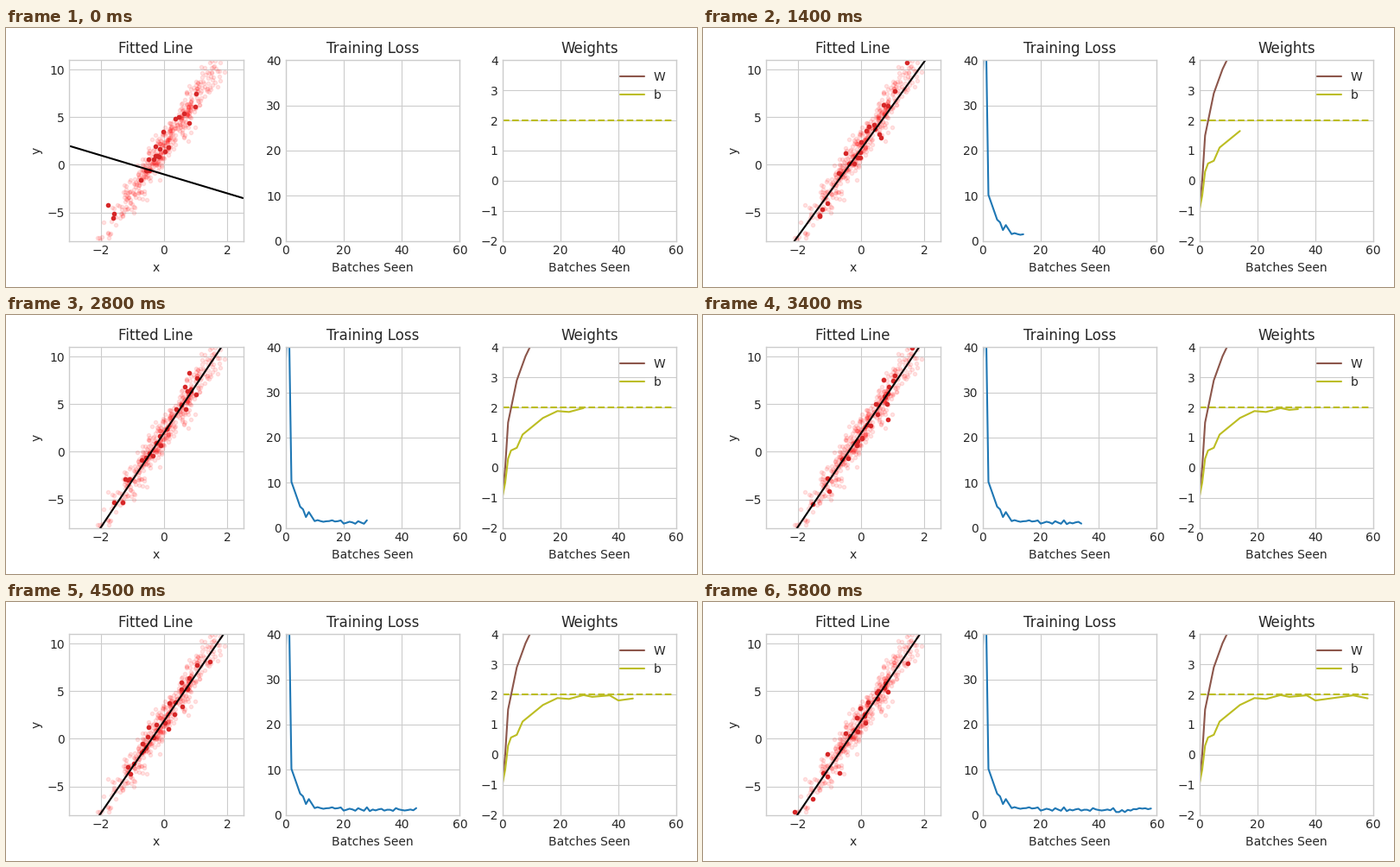
A matplotlib script that plays this animation: 800x300 px, repeating every 5900 ms.

```python
import matplotlib.pyplot as plt
import numpy as np
from matplotlib.animation import FuncAnimation

STEPS, BATCH, COUNT = 59, 25, 500
TRUE_W, TRUE_B = 5, 2

plt.style.use("seaborn-v0_8-whitegrid")
plt.rcParams.update({"font.family": "DejaVu Sans", "font.size": 10})

# Noisy linear data, reshuffled every epoch
rng = np.random.default_rng(3)
xs = rng.normal(0, 1, COUNT)
ys = TRUE_W * xs + TRUE_B + rng.normal(0, 1, COUNT)
order = np.concatenate([rng.permutation(COUNT) for _ in range(3)])

steps = np.arange(STEPS)


def curve(*points):
    """Value at every step, linear between (step, value) points."""
    return np.interp(steps, *zip(*points))


# Training history: fast descent, then jitter around the optimum
w = curve((0, -1), (1, 0), (2, 1.5), (5, 2.9), (8, 3.7),
          (12, 4.5), (20, 4.91), (28, 4.98), (45, 4.86), (58, 4.91))
b = curve((0, -1), (1, -.5), (2, .3), (3, .57), (5, .66), (7, 1.1),
          (14, 1.65), (19, 1.88), (23, 1.85), (28, 1.98), (31, 1.92),
          (37, 1.97), (40, 1.8), (53, 1.97), (58, 1.87))
loss = curve((0, 36), (1, 52), (2, 10.2), (5, 4.7), (6, 4.1),
             (7, 2.4), (8, 3.5), (10, 1.5), (20, 1.2), (58, 1.1))
loss += np.where(steps > 10, rng.normal(0, 0.28, STEPS).clip(-.5, .5), 0)

fig, (ax_fit, ax_loss, ax_w) = plt.subplots(1, 3, figsize=(8, 3), dpi=100)


def setup(ax, title, xlabel, xlim, ylim, xticks, yticks):
    ax.set(title=title, xlabel=xlabel, xlim=xlim, ylim=ylim,
           xticks=xticks, yticks=yticks)


setup(ax_fit, "Fitted Line", "x", (-3, 2.5), (-8, 11),
      [-2, 0, 2], [-5, 0, 5, 10])
ax_fit.set_ylabel("y")
setup(ax_loss, "Training Loss", "Batches Seen", (0, 60), (0, 40),
      range(0, 61, 20), range(0, 41, 10))
setup(ax_w, "Weights", "Batches Seen", (0, 60), (-2, 4),
      range(0, 61, 20), range(-2, 5))

ax_fit.plot(xs, ys, "r.", ms=6, alpha=0.1)
dots, = ax_fit.plot([], [], ".", ms=6, color="tab:red")
fit, = ax_fit.plot([], [], color="black")
loss_line, = ax_loss.plot([], [], color="tab:blue")
w_line, = ax_w.plot([], [], color="tab:brown", label="W")
b_line, = ax_w.plot([], [], color="tab:olive", label="b")
for value, color in ((TRUE_W, "tab:brown"), (TRUE_B, "tab:olive")):
    ax_w.plot([0, STEPS], [value, value], "--", color=color)
ax_w.legend(loc="upper right")

fig.tight_layout()
fig.subplots_adjust(left=72.9 / 800, right=776.2 / 800, wspace=49.2 / 201.6)


def update(k):
    pick = order[k * BATCH:(k + 1) * BATCH]
    dots.set_data(xs[pick], ys[pick])
    ends = np.array([-3, 2.5])
    fit.set_data(ends, w[k] * ends + b[k])
    for line, series in ((loss_line, loss), (w_line, w), (b_line, b)):
        line.set_data(steps[:k + 1], series[:k + 1])
    return dots, fit, loss_line, w_line, b_line


anim = FuncAnimation(fig, update, frames=STEPS, interval=100,
                     repeat=True, repeat_delay=0)
plt.show()
```
